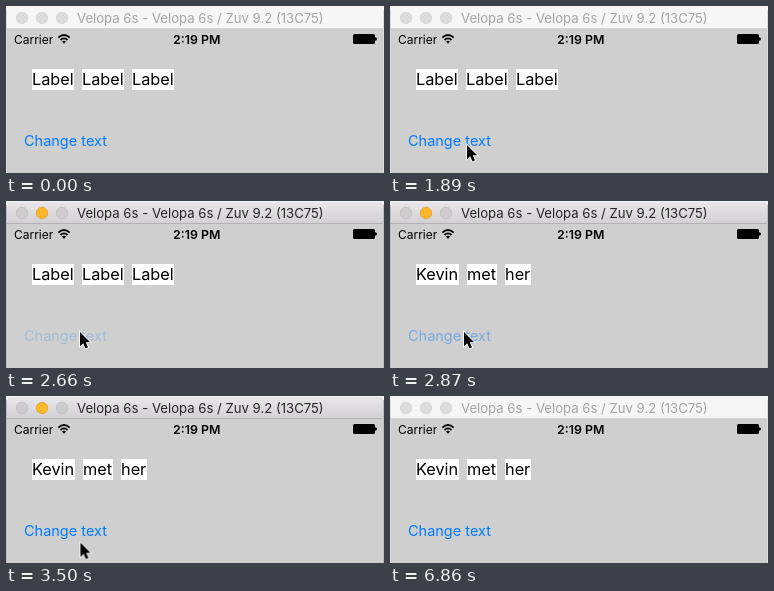
Recreate the animation shown at these times as an HTML page. Size 378 by 167 pixels, loop 7000 ms.

```html
<!DOCTYPE html>
<html lang="en">
<head>
<meta charset="utf-8">
<title>Simulator labels</title>
<style>
  html, body { margin: 0; width: 100%; height: 100%; overflow: hidden; background: #f4f4f4; }
  svg { display: block; width: 100%; height: 100%; }
  text { font-family: Inter, Roboto, sans-serif; }

  /* 1% of the loop is one 70 ms step */
  .active, .inactive, .before, .after { animation: 7s step-end infinite; }
  .active { animation-name: focused; }
  .inactive { animation-name: unfocused; }
  .before { animation-name: before; }
  .after { animation-name: after; }
  @keyframes focused { 0%, 98%, 100% { visibility: hidden } 38% { visibility: visible } }
  @keyframes unfocused { 0%, 98%, 100% { visibility: visible } 38% { visibility: hidden } }
  @keyframes before { 0%, 100% { visibility: visible } 40% { visibility: hidden } }
  @keyframes after { 0%, 100% { visibility: hidden } 40% { visibility: visible } }

  .title { font-size: 13.15px; }
  .status { font-size: 12px; }
  .time { font-size: 12.4px; font-weight: 600; }
  .label { font-size: 16.3px; }
  .box { fill: #fff; }

  .button { font-size: 14.5px; fill: #007aff; animation: press 7s infinite; }
  @keyframes press {
    0% { opacity: 1; animation-timing-function: step-end }
    38% { opacity: .2; animation-timing-function: step-end }
    39% { opacity: .2; animation-timing-function: steps(7, end) }
    46%, 100% { opacity: 1 }
  }

  .cursor { paint-order: stroke; animation: point 7s infinite; }
  @keyframes point {
    0% { transform: translate(82px, 190px); animation-timing-function: step-end }
    23% { transform: translate(83px, 157.5px); animation-timing-function: steps(4, end) }
    27% { transform: translate(77px, 139px); animation-timing-function: steps(5, end) }
    32% { transform: translate(74px, 131px); animation-timing-function: step-end }
    48% { transform: translate(74px, 131px); animation-timing-function: steps(5, end) }
    53% { transform: translate(75px, 170px); animation-timing-function: step-end }
    100% { transform: translate(82px, 190px) }
  }
</style>
</head>
<body>
<svg viewBox="0 0 378 167" preserveAspectRatio="none">
  <defs>
    <linearGradient id="bar" x2="0" y2="1">
      <stop stop-color="#e8e6e8"/>
      <stop offset="1" stop-color="#d2d0d2"/>
    </linearGradient>
    <path id="barShape" d="M1 23V5Q1 1 5 1H373Q377 1 377 5V23Z"/>
  </defs>

  <g class="inactive">
    <path d="M0 4H1V167H0ZM377 4H378V167H377Z" fill="#dedede"/>
    <use href="#barShape" fill="#f6f6f6"/>
    <path d="M1 22.5H377" stroke="#d4d4d4"/>
    <g fill="#dcdcdc" stroke="#cecece" stroke-width=".7">
      <circle cx="16" cy="12" r="5.7"/>
      <circle cx="36" cy="12" r="5.7"/>
      <circle cx="56" cy="12" r="5.7"/>
    </g>
    <text class="title" x="71" y="17" fill="#a5a5a5">Velopa 6s - Velopa 6s / Zuv 9.2 (13C75)</text>
  </g>

  <g class="active">
    <path d="M0 4H1V167H0ZM377 4H378V167H377Z" fill="#bdbdbd"/>
    <use href="#barShape" fill="url(#bar)"/>
    <path d="M1 22.5H377" stroke="#b4b2b4"/>
    <g fill="#cecccd" stroke="#bab8ba" stroke-width=".7">
      <circle cx="16" cy="12" r="5.7"/>
      <circle cx="36" cy="12" r="5.7" fill="#fdb72b" stroke="#df9d25"/>
      <circle cx="56" cy="12" r="5.7"/>
    </g>
    <text class="title" x="71" y="17" fill="#262428">Velopa 6s - Velopa 6s / Zuv 9.2 (13C75)</text>
  </g>

  <rect x="1" y="23" width="376" height="144" fill="#cfcfcf"/>

  <text class="status" x="8" y="38">Carrier</text>
  <g fill="none" stroke="#000" stroke-width="1.7">
    <path d="M52.3 31.6Q58 26.4 63.7 31.6"/>
    <path d="M54.5 34Q58 30.8 61.5 34"/>
  </g>
  <path d="M56 35.6Q58 33.8 60 35.6L58 37.8Z"/>
  <text class="time" x="167" y="38">2:19 PM</text>
  <rect x="347" y="28" width="22" height="10" rx="1.5"/>
  <path d="M369 31.2Q371 31.4 371 33T369 34.8Z"/>

  <g class="before label">
    <path class="box" d="M26 63H68V84H26ZM76 63H118V84H76ZM126 63H168V84H126Z"/>
    <text x="26" y="79">Label</text>
    <text x="76" y="79">Label</text>
    <text x="126" y="79">Label</text>
  </g>
  <g class="after label">
    <path class="box" d="M26 63H69V84H26ZM77 63H107V84H77ZM115 63H141V84H115Z"/>
    <text x="26" y="79">Kevin</text>
    <text x="77" y="79">met</text>
    <text x="115" y="79">her</text>
  </g>

  <text class="button" x="18" y="140">Change text</text>

  <path class="cursor" d="M0 0V14.2L3.2 11.2 5.5 16.4 8 15.3 5.7 10.2H10.2Z" stroke="#fff" stroke-width="1.6"/>
</svg>
</body>
</html>
```
